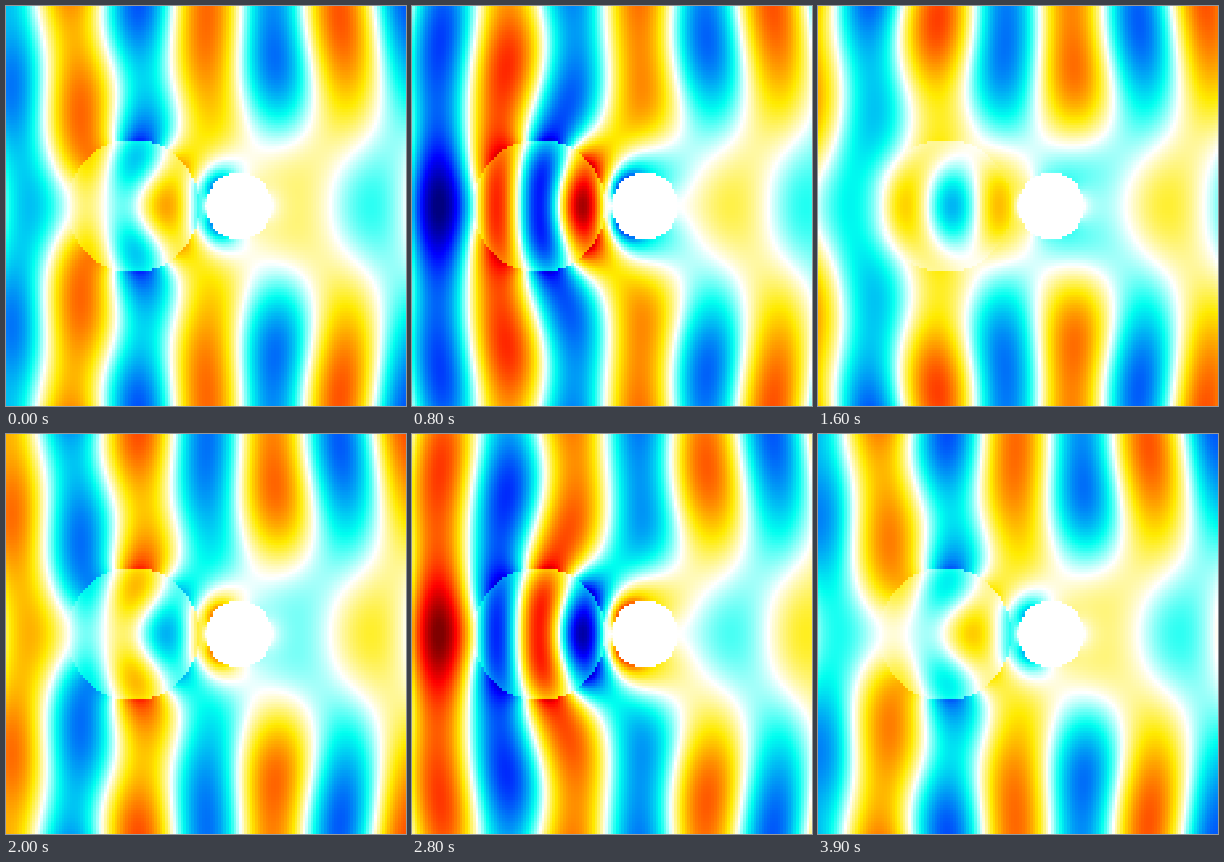
Write an HTML page with a canvas that moves like this. It is 400 by 400 pixels and loops after 4 s.

```html
<!DOCTYPE html>
<html lang="en">
<head>
<meta charset="utf-8">
<title>Wave scattering by two cylinders</title>
<style>
  html, body { margin: 0; width: 100%; height: 100%; overflow: hidden; background: #fff; }
  canvas { display: block; width: 400px; height: 400px; image-rendering: pixelated; }
</style>
</head>
<body>
<canvas id="view" width="151" height="151"></canvas>
<script>
// Plane wave meeting a dielectric and a conducting cylinder; the view shows E_y.
// Lengths are in wavelengths.
const SIZE = 151, HALF = 1.5, PERIOD = 4000, STEP = 100;
const K = 2 * Math.PI, EPS = 2.5, INDEX = Math.sqrt(EPS), GAIN = 0.5;
const GLASS = { x: -0.55, r: 0.5 };
const METAL = { x: 0.25, r: 0.25 };
const ORDER = 16, TOP = 2 * ORDER + 2;
const STOPS = [
  [-1, 0, 0, 128], [-0.75, 0, 0, 255], [-0.25, 0, 255, 240], [0, 255, 255, 255],
  [0.25, 255, 235, 0], [0.75, 255, 0, 0], [1, 128, 0, 0]
];

const add = (a, b) => [a[0] + b[0], a[1] + b[1]];
const sub = (a, b) => [a[0] - b[0], a[1] - b[1]];
const mul = (a, b) => [a[0] * b[0] - a[1] * b[1], a[0] * b[1] + a[1] * b[0]];
const scale = (a, s) => [a[0] * s, a[1] * s];
const div = (a, b) => scale(mul(a, [b[0], -b[1]]), 1 / (b[0] * b[0] + b[1] * b[1]));
const cis = t => [Math.cos(t), Math.sin(t)];
const iPow = n => [[1, 0], [0, 1], [-1, 0], [0, -1]][n & 3];
const sign = n => (n & 1 ? -1 : 1);

// J_n by downward recurrence
function besselJ(x) {
  const last = 60, J = new Array(last + 2).fill(0);
  J[last] = 1e-150;
  for (let n = last; n > 0; n--) J[n - 1] = 2 * n / x * J[n] - J[n + 1];
  let sum = J[0];
  for (let n = 2; n <= last; n += 2) sum += 2 * J[n];
  return J.map(v => v / sum);
}

// H_n = J_n + i Y_n, with Y_n by upward recurrence
function hankel(x) {
  const J = besselJ(x), Y = [], log = Math.log(x / 2) + 0.5772156649015329;
  let s0 = 0, s1 = 0;
  for (let k = 1; k < 29; k++) {
    s0 += sign(k) * J[2 * k] / k;
    s1 += sign(k) * (2 * k + 1) / (k * (k + 1)) * J[2 * k + 1];
  }
  Y[0] = 2 / Math.PI * (log * J[0] - 2 * s0);
  Y[1] = 2 / Math.PI * ((log - 1) * J[1] - J[0] / x - s1);
  for (let n = 1; n < TOP; n++) Y[n + 1] = 2 * n / x * Y[n] - Y[n - 1];
  return Y.map((y, n) => [J[n], y]);
}

const slopeJ = (J, n) => n ? (J[n - 1] - J[n + 1]) / 2 : -J[1];
const slopeH = (H, n) => n ? scale(sub(H[n - 1], H[n + 1]), 0.5) : scale(H[1], -1);

function solve(A, b) {
  const n = b.length;
  for (let p = 0; p < n; p++)
    for (let r = p + 1; r < n; r++) {
      const f = div(A[r][p], A[p][p]);
      for (let c = p; c < n; c++) A[r][c] = sub(A[r][c], mul(f, A[p][c]));
      b[r] = sub(b[r], mul(f, b[p]));
    }
  for (let p = n - 1; p >= 0; p--) {
    for (let c = p + 1; c < n; c++) b[p] = sub(b[p], mul(A[p][c], b[c]));
    b[p] = div(b[p], A[p][p]);
  }
  return b;
}

// Multipole coefficients of H_z around each cylinder and inside the dielectric
function scatter() {
  const count = ORDER + 1;
  const Jg = besselJ(K * GLASS.r), Hg = hankel(K * GLASS.r), Ji = besselJ(K * INDEX * GLASS.r);
  const Jm = besselJ(K * METAL.r), Hm = hankel(K * METAL.r);
  const Hd = hankel(K * (METAL.x - GLASS.x));
  const tGlass = [], tMetal = [];
  for (let n = 0; n < count; n++) {
    const di = slopeJ(Ji, n) / INDEX;
    const num = Jg[n] * di - slopeJ(Jg, n) * Ji[n];
    tGlass[n] = div([num, 0], sub(scale(slopeH(Hg, n), Ji[n]), scale(Hg[n], di)));
    tMetal[n] = div([-slopeJ(Jm, n), 0], slopeH(Hm, n));
  }
  const link = (n, m) => {
    const near = scale(Hd[Math.abs(m - n)], m < n ? sign(n - m) : 1);
    return m ? add(near, scale(Hd[m + n], sign(n))) : near;
  };
  const A = [], b = [];
  for (let row = 0; row < 2 * count; row++) {
    const inMetal = row >= count, n = row % count;
    const t = inMetal ? tMetal[n] : tGlass[n];
    A[row] = [];
    for (let col = 0; col < 2 * count; col++) {
      const m = col % count;
      if ((col >= count) === inMetal) A[row][col] = [row === col ? 1 : 0, 0];
      else A[row][col] = scale(mul(t, link(n, m)), inMetal ? -1 : -sign(m + n));
    }
    b[row] = mul(t, mul(iPow(n), cis(K * (inMetal ? METAL.x : GLASS.x))));
  }
  const all = solve(A, b), glass = all.slice(0, count), metal = all.slice(count);
  const inner = glass.map((a, n) =>
    scale(add(scale(div(a, tGlass[n]), Jg[n]), mul(a, Hg[n])), 1 / Ji[n]));
  return { glass, metal, inner };
}

// Coefficients of E_y from those of H_z
function toEy(a, factor) {
  const at = n => a[n] || [0, 0], out = [];
  for (let n = 0; n <= ORDER + 1; n++) {
    const before = n ? at(n - 1) : scale(at(1), -1);
    out[n] = scale(mul(sub(at(n + 1), before), [0, -0.5]), factor * (n ? 2 : 1));
  }
  return out;
}

function expand(coef, waves, angle) {
  let re = 0, im = 0;
  coef.forEach((c, n) => {
    const v = scale(mul(c, waves[n]), Math.cos(n * angle));
    re += v[0];
    im += v[1];
  });
  return [re, im];
}

const modes = scatter();
const eGlass = toEy(modes.glass, 1), eMetal = toEy(modes.metal, 1);
const eInner = toEy(modes.inner, 1 / INDEX);

function fieldAt(x, y) {
  const rg = Math.hypot(x - GLASS.x, y), ag = Math.atan2(y, x - GLASS.x);
  const rm = Math.hypot(x - METAL.x, y), am = Math.atan2(y, x - METAL.x);
  if (rm <= METAL.r + 1e-9) return [0, 0];
  if (rg < GLASS.r - 1e-9)
    return expand(eInner, besselJ(K * INDEX * rg).map(v => [v, 0]), ag);
  const scattered = add(expand(eGlass, hankel(K * rg), ag), expand(eMetal, hankel(K * rm), am));
  return add(cis(K * x), scattered);
}

const field = new Array(SIZE * SIZE), mid = (SIZE - 1) / 2;
for (let j = 0; j <= mid; j++)
  for (let i = 0; i < SIZE; i++) {
    const v = scale(fieldAt((i - mid) / mid * HALF, (mid - j) / mid * HALF), GAIN);
    field[j * SIZE + i] = field[(SIZE - 1 - j) * SIZE + i] = v;
  }

const ctx = document.getElementById("view").getContext("2d");
const image = ctx.createImageData(SIZE, SIZE), px = image.data;

function paint(p, value) {
  const v = Math.max(-1, Math.min(1, value));
  let s = 1;
  while (v > STOPS[s][0]) s++;
  const a = STOPS[s - 1], b = STOPS[s], f = (v - a[0]) / (b[0] - a[0]);
  for (let c = 0; c < 3; c++) px[p + c] = a[c + 1] + (b[c + 1] - a[c + 1]) * f;
  px[p + 3] = 255;
}

function draw(step) {
  const [c, s] = cis(2 * Math.PI * step * STEP / PERIOD);
  field.forEach(([re, im], i) => paint(4 * i, re * c + im * s));
  ctx.putImageData(image, 0, 0);
}

let shown = -1;
const start = performance.now();
function tick() {
  const step = Math.floor((performance.now() - start) % PERIOD / STEP);
  if (step !== shown) draw(shown = step);
  requestAnimationFrame(tick);
}
draw(shown = 0);
requestAnimationFrame(tick);
</script>
</body>
</html>
```
